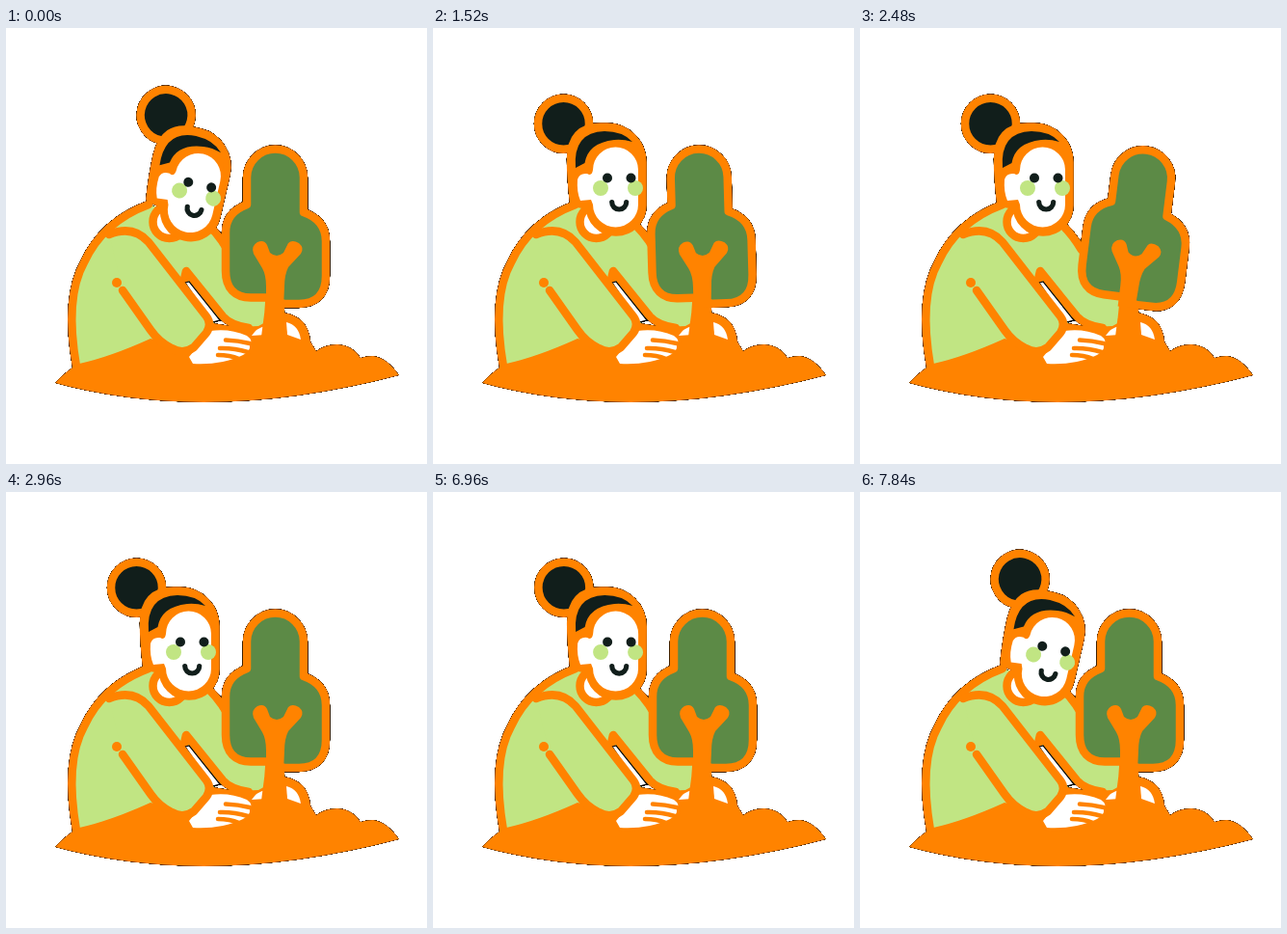
Animation, 437 px wide and 452 px high, one loop 8 s. Source, as an HTML page:

```html
<!DOCTYPE html>
<html lang="en">
<head>
<meta charset="utf-8">
<title>Planting a tree</title>
<style>
  html, body { margin: 0; width: 100%; height: 100%; overflow: hidden; background: #fff; }
  svg { display: block; width: 437px; height: 452px; }
  .line { stroke: #ff8300; stroke-width: 8.5; stroke-linecap: round; stroke-linejoin: round; }
  .orange { fill: #ff8300; }
  .lime { fill: #c1e583; }
  .leaf { fill: #5c8a46; }
  .ink { fill: #111e1b; }
  .white { fill: #fff; }
  .none { fill: none; }
</style>
</head>
<body>
<svg viewBox="0 0 437 452">
  <!-- thin dark fringe around the whole silhouette -->
  <filter id="fringe" x="0" y="0" width="437" height="452" filterUnits="userSpaceOnUse" color-interpolation-filters="sRGB">
    <feGaussianBlur in="SourceAlpha" stdDeviation=".4"/>
    <feComponentTransfer result="edge"><feFuncA type="linear" slope="8" intercept="-1"/></feComponentTransfer>
    <feMerge><feMergeNode in="edge"/><feMergeNode in="SourceGraphic"/></feMerge>
  </filter>
  <g filter="url(#fringe)">
    <!-- torso and far arm -->
    <path class="lime" d="M73 351C65 305 67 268 81 243C92 219 113 196 148 183L205 200Q218 212 228 228L275 280V315H250L222 298L190 340Z"/>
    <path class="line none" d="M73 351C65 305 67 268 81 243C92 219 113 196 148 183M205 200Q218 210 230 230M184 265L187 252L225 299Q233 308 252 311"/>
    <circle class="line white" cx="169.500" cy="201" r="17"/>
    <path class="white" stroke="#000" stroke-width="1.200" d="M186 264L190 263L222 303L214 305Z"/>

    <path class="orange" d="M51 368Q60 358 69 352L76 348Q108 341 150 322L180 330L215 306L240 310L262 309L288 295Q314 299 316 325L322 335Q331 328 344 328Q360 329 368 342Q374 340 381 340Q396 342 408 360Q300 388 205 388Q120 387 51 368Z"/>
    <path class="white" d="M255 319Q260 311 269 309V318ZM291 305Q304 308 306 323L292 318Z"/>

    <path class="orange" d="M265 320Q269 295 270 270H289Q288 295 292 320Z"/>
    <g id="tree">
      <path class="line leaf" d="M250 183V155A29.500 29.500 0 0 1 309 155V191Q332 199 332 221V257C332 276 322 286 304 286H290Q284 286 278 279.500H254C238 279.500 228 270 228 252V212Q228 191 250 183Z"/>
      <path class="orange" d="M270 290V268Q270 256 266 249L257 234Q254 226 261 222Q268 219 271 225L274 233Q281 239 288 233L293 223Q297 219 304 223Q310 228 306 234L293 248Q289 256 289 268L288 290Z"/>
    </g>

    <g id="head">
      <circle id="bun" class="line ink" cx="135.500" cy="99.300" r="26.500"/>
      <path class="line orange" d="M146 181Q143 155 143 136Q143 102.500 174 102.500H181A36.500 36.500 0 0 1 217.500 139V184A27.500 27.500 0 0 1 162.500 184Z"/>
      <path class="ink" d="M148 145Q145 108 178 107Q197 107 207 118Q197 115 188 116Q161 119 157.500 140Z"/>
      <path class="white" d="M213 147V183A23.500 23.500 0 0 1 166 183L164 178L153 179Q149 170 150 157Q152 150 160 151Q165 154 166 147A23.500 23.500 0 0 1 213 147Z"/>
      <g class="lime"><circle cx="174" cy="166" r="8"/><circle cx="210" cy="166" r="8"/></g>
      <g id="eyes" class="ink"><circle cx="181" cy="155.500" r="5"/><circle cx="205.500" cy="155.500" r="5"/></g>
      <path class="none" stroke="#111e1b" stroke-width="5.200" stroke-linecap="round" d="M185.700 180.500A7.500 7.500 0 0 0 200.700 180.500"/>
    </g>

    <g id="hand">
      <path class="line white" style="stroke-width:7;paint-order:stroke" d="M194 348L190 341L212 314Q232 311 250 319Q257 324 253 329Q254 335 246 339Q238 343 225 346Q210 349 194 348Z"/>
      <path class="line none" style="stroke-width:4.500" d="M228 323.500Q241 324 253 327M222 332Q236 331.500 251 336M220 339Q232 339 242 343"/>
    </g>

    <!-- near arm -->
    <path class="line lime" d="M107 214Q132 204 148 222L208 299Q214 307 208 316L195 331Q184 339 172 332Q159 326 150 313L121 272"/>
    <circle class="orange" cx="115" cy="264" r="5"/>
  </g>
</svg>
<script>
  const LOOP = 8000;
  const part = id => document.getElementById(id);
  const [tree, head, bun, eyes, hand] = ['tree', 'head', 'bun', 'eyes', 'hand'].map(part);
  const set = (el, value) => el.setAttribute('transform', value);
  const span = (t, from, to) => Math.min(1, Math.max(0, (t - from) / (to - from)));
  const ease = (t, from, to) => {
    const p = span(t, from, to);
    return p * p * (3 - 2 * p);
  };

  function draw(t) {
    const tilt = 1 - ease(t, 840, 1480) + ease(t, 6900, 7820);
    set(head, `rotate(${13 * tilt} 166 194)`);
    set(bun, `translate(${7.3 * tilt} ${-6.3 * tilt})`);

    const sway = -ease(t, 1400, 1800) + 2 * ease(t, 1800, 2400) - ease(t, 2400, 2960);
    set(tree, `rotate(${7.5 * sway} 280 270)`);

    // two pats on the soil
    const pat = (1 - Math.cos(span(t, 0, 960) * 4 * Math.PI)) / 2;
    set(hand, `rotate(${-14 * pat} 198 338)`);

    const open = 1 - 0.9 * Math.sin(span(t, 4520, 4960) * Math.PI);
    set(eyes, `translate(0 ${155.5 * (1 - open)}) scale(1 ${open})`);
  }

  const start = performance.now();
  function tick() {
    draw((performance.now() - start) % LOOP);
    requestAnimationFrame(tick);
  }
  tick();
</script>
</body>
</html>
```
